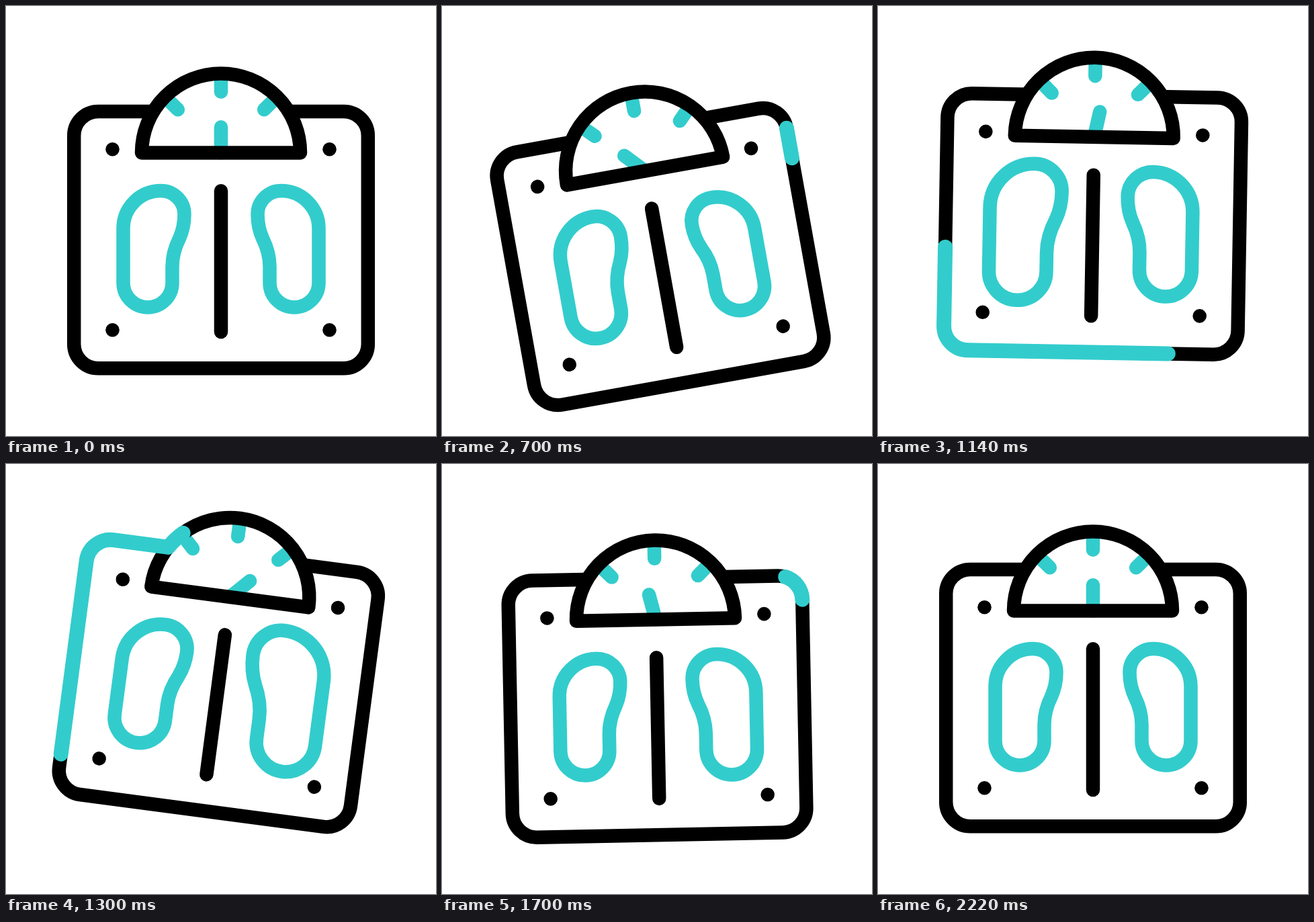
Animation of 640 by 640 pixels, one loop 2400 ms. Source, as an HTML page with a canvas:

```html
<!DOCTYPE html>
<html lang="en">
<head>
<meta charset="utf-8">
<title>Bathroom scale</title>
<style>
html, body { margin: 0; width: 100%; height: 100%; overflow: hidden; background: #fff; }
canvas { display: block; width: 100vw; height: 100vh; }
</style>
</head>
<body>
<canvas id="stage" width="640" height="640"></canvas>
<script>
const ctx = document.getElementById('stage').getContext('2d');
const LOOP = 2400, STEP = 20;
const BLACK = '#000', TEAL = '#33cccc', WHITE = '#fff';
const LINE = 20.5, TRAIL = 22;
const PI = Math.PI, RAD = PI / 180;

// Body outline (centre line) and dome
const L = 101.2, R = 538.8, T = 157, B = 539.2, CORNER = 36;
const CX = 320, DOME_Y = 218.5, DOME_R = 118;
const HALF = Math.acos((DOME_Y - T) / DOME_R);
const JOIN = DOME_R * Math.sin(HALF);
const OUTLINE = 2 * (R - L - 2 * CORNER) + 2 * (B - T - 2 * CORNER)
  + 2 * PI * CORNER - 2 * JOIN + 2 * HALF * DOME_R;

// Keys are [time, value] pairs, eased in and out between neighbours
const TILT = [[200, 0], [800, -11], [1400, 9], [1800, -3], [2200, 0]];
const LIFT = [[200, 0], [700, 25.4], [1200, -25.7], [1680, 13], [2200, 0]];
const NEEDLE = [[200, 0], [800, -47], [1400, 51], [1800, -26], [2200, 0]];
const LEFT_FOOT = [[600, 1], [1000, 1.24], [1400, 1]];
const RIGHT_FOOT = [[1000, 1], [1400, 1.24], [1800, 1]];
const HEAD = [[600, 0], [1600, OUTLINE]];
const TAIL = [[800, 0], [1800, OUTLINE]];

function at(keys, t) {
  if (t <= keys[0][0]) return keys[0][1];
  for (let i = 1; i < keys.length; i++) {
    const [t0, a] = keys[i - 1], [t1, b] = keys[i];
    if (t < t1) {
      const s = (t - t0) / (t1 - t0);
      return a + (b - a) * s * s * (3 - 2 * s);
    }
  }
  return keys[keys.length - 1][1];
}

function stroke(color, path, width = LINE) {
  ctx.strokeStyle = color;
  ctx.lineWidth = width;
  ctx.stroke(path);
}

function segment(x1, y1, x2, y2) {
  const p = new Path2D();
  p.moveTo(x1, y1);
  p.lineTo(x2, y2);
  return p;
}

function spoke(deg, from, to) {
  const x = Math.sin(deg * RAD), y = -Math.cos(deg * RAD);
  return segment(CX + x * from, DOME_Y + y * from, CX + x * to, DOME_Y + y * to);
}

const body = new Path2D();
body.roundRect(L, T, R - L, B - T, CORNER);

const dome = new Path2D();
dome.arc(CX, DOME_Y, DOME_R, PI, 2 * PI);
dome.closePath();

// Clockwise silhouette, starting at the top of the right side
const outline = new Path2D();
outline.moveTo(R, T + CORNER);
outline.arcTo(R, B, L, B, CORNER);
outline.arcTo(L, B, L, T, CORNER);
outline.arcTo(L, T, R, T, CORNER);
outline.lineTo(CX - JOIN, T);
outline.arc(CX, DOME_Y, DOME_R, -PI / 2 - HALF, -PI / 2 + HALF);
outline.arcTo(R, T, R, B, CORNER);

// Left sole around its own centre
const FOOT_X = 220, FOOT_Y = 362;
function sole(k) {
  const p = new Path2D();
  p.arc(10.5 * k, -31 * k, 56 * k, PI, 1.5 * PI);
  p.arc(10.5 * k, -52 * k, 35 * k, 1.5 * PI, 2 * PI);
  p.bezierCurveTo(45.5 * k, -37 * k, 43 * k, -27 * k, 38 * k, -16 * k);
  p.bezierCurveTo(31 * k, -2 * k, 27.5 * k, 12 * k, 27.5 * k, 26 * k);
  p.arc(-9 * k, 50 * k, 36.5 * k, 0, PI);
  p.closePath();
  return p;
}

function foot(side, k) {
  ctx.save();
  ctx.translate(CX + side * (CX - FOOT_X), FOOT_Y);
  ctx.scale(-side, 1);
  stroke(TEAL, sole(k));
  ctx.restore();
}

function dot(x, y) {
  ctx.beginPath();
  ctx.arc(x, y, 10.3, 0, 2 * PI);
  ctx.fill();
}

function draw(t) {
  ctx.setTransform(1, 0, 0, 1, 0, 0);
  ctx.fillStyle = WHITE;
  ctx.fillRect(0, 0, 640, 640);
  ctx.lineCap = ctx.lineJoin = 'round';

  ctx.translate(320, 320 + at(LIFT, t));
  ctx.rotate(at(TILT, t) * RAD);
  ctx.translate(-320, -320);

  stroke(BLACK, body);
  ctx.fillStyle = BLACK;
  for (const x of [158.5, 481.5]) for (const y of [213.3, 482.3]) dot(x, y);
  stroke(BLACK, segment(CX, 275.3, CX, 485));
  foot(-1, at(LEFT_FOOT, t));
  foot(1, at(RIGHT_FOOT, t));

  ctx.fillStyle = WHITE;
  ctx.fill(dome);
  for (const deg of [-45, 0, 45]) stroke(TEAL, spoke(deg, 90.7, DOME_R - 3));
  stroke(TEAL, spoke(at(NEEDLE, t), 0, 38.3));
  stroke(BLACK, dome);

  const head = at(HEAD, t), tail = at(TAIL, t);
  if (head - tail > 0.1) {
    ctx.setLineDash([head - tail, 2 * OUTLINE]);
    ctx.lineDashOffset = -tail;
    stroke(TEAL, outline, TRAIL);
    ctx.setLineDash([]);
  }
}

const start = performance.now();
function tick() {
  const t = (performance.now() - start) % LOOP;
  draw(Math.floor(t / STEP) * STEP);
  requestAnimationFrame(tick);
}
tick();
</script>
</body>
</html>
```
